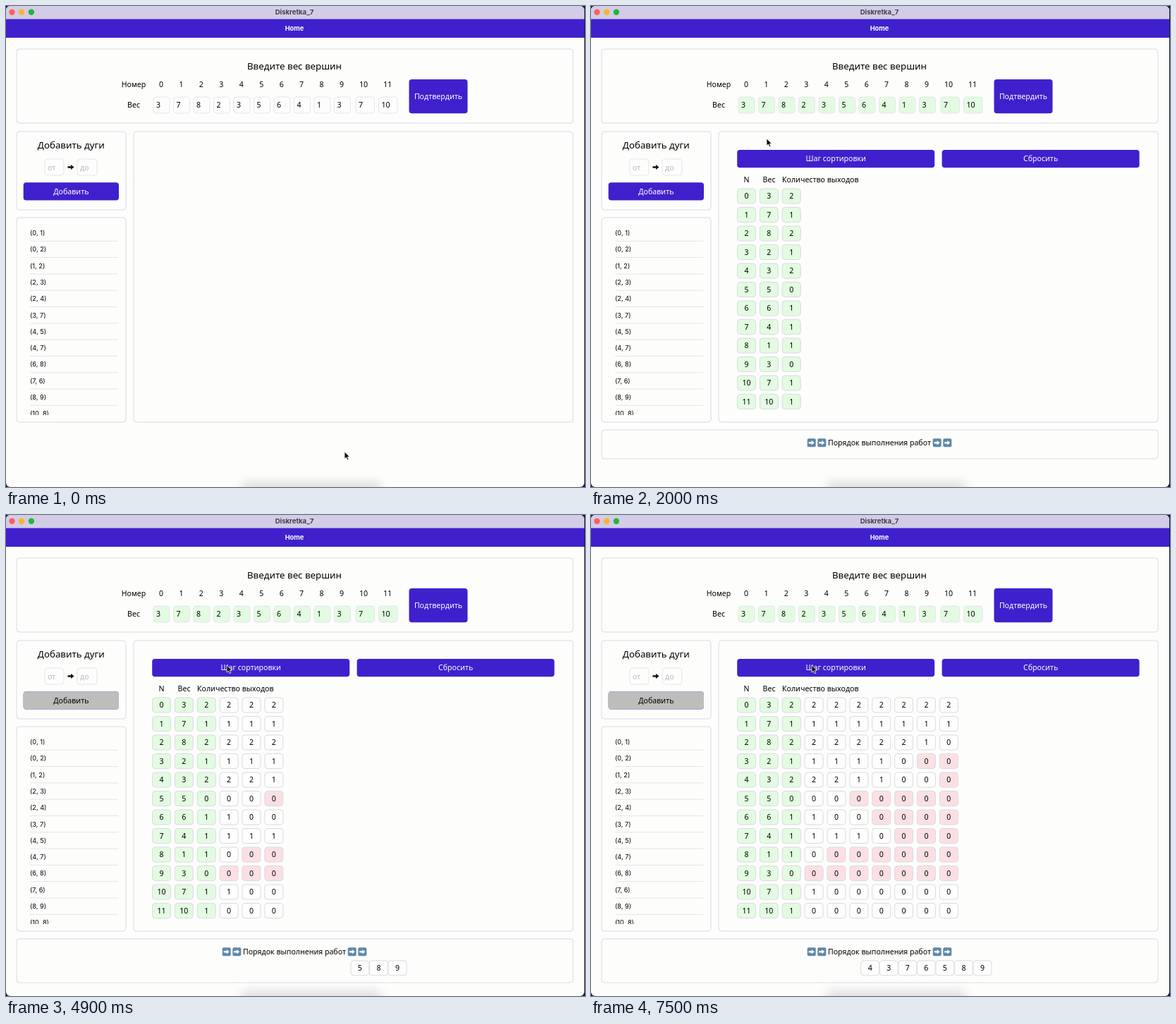
An HTML page that plays this animation: 821 px wide and 682 px high, repeating every 8000 ms.

```html
<!DOCTYPE html>
<html lang="ru">
<head>
<meta charset="utf-8">
<title>Diskretka_7</title>
<style>
  html, body { margin: 0; width: 100%; height: 100%; overflow: hidden; background: #17124a; }
  svg { display: block; }
  text { font: 10.6px "Noto Sans", sans-serif; fill: #000; }
  .big { font-size: 13.25px; }
  .ui { font: 700 9.3px Inter, sans-serif; fill: #fff; }
  .title { font: 700 9.6px Inter, sans-serif; fill: #433e4a; }
  .item { font: 9.2px Inter, sans-serif; }
  .light { fill: #fff; }
  .hint { fill: #b9b9c2; }
</style>
</head>
<body>
<svg id="stage" width="821" height="682" viewBox="0 0 821 682"></svg>
<script>
const LOOP = 8000;
const READY = 2000;
const STEPS = [3300, 4000, 4600, 5200, 5900, 6700, 7500];
const BLUE = '#4020cd', GREY = '#bdbdbc', PAPER = '#fdfdfc', LINE = '#dadae4', FAINT = '#e5e5ec';
const GREEN = '#e3fbe1', PINK = '#fbe0e3';
const weights = [3, 7, 8, 2, 3, 5, 6, 4, 1, 3, 7, 10];
const edges = [[0, 1], [0, 2], [1, 2], [2, 3], [2, 4], [3, 7], [4, 5], [4, 7], [6, 8], [7, 6], [8, 9], [10, 8], [11, 9]];
const removalOrder = [9, 8, 5, 6, 7, 3, 4];

// Cursor path: time, x, y
const path = [[0, 480, 632], [400, 403, 180], [600, 403, 180], [1100, 611, 122], [1300, 611, 122],
  [1600, 249, 188], [2100, 249, 188], [2700, 313, 213], [LOOP, 313, 213]];

const text = (s, x, y, cls = '', anchor = 'middle', size = 10.6) =>
  `<text x="${x}" y="${y + size * 0.357}" class="${cls}" text-anchor="${anchor}">${s}</text>`;
const box = (x, y, w, h, fill = PAPER, line = LINE, extra = '') =>
  `<rect x="${x}" y="${y}" width="${w}" height="${h}" rx="4" fill="${fill}" stroke="${line}" ${extra}/>`;
const button = (s, x, y, w, h, fill = BLUE, cls = 'light') =>
  `<rect x="${x}" y="${y}" width="${w}" height="${h}" rx="4" fill="${fill}"/>` + text(s, x + w / 2, y + h / 2, cls);
const cell = (s, x, y, fill) => box(x - 13, y - 10.5, 26, 21, fill) + text(s, x, y);
const arrow = (x, y, color, scale = 1) =>
  `<path transform="translate(${x} ${y}) scale(${scale})" fill="${color}" d="M-5-1.5H0V-4L5 0L0 4V1.5H-5Z"/>`;
const emoji = x => `<rect x="${x - 6}" y="613.2" width="12" height="12" rx="2" fill="#5f89a8"/>` + arrow(x, 619.2, '#fff', 0.8);
const column = (values, c, fill) =>
  values.map((v, r) => cell(v, 220.5 + 31.87 * c, 269.5 + 26.5 * r, fill(r))).join('');
const group = (id, content) => `<g id="${id}">${content}</g>`;

// The two-digit columns are wider
const inputX = i => i < 10 ? 209 + 28.5 * i : 496 + 32.5 * (i - 10);
const inputWidth = i => i < 10 ? 23 : 26.5;

const weightInputs = fill => weights.map((w, i) =>
  box(inputX(i), 129, inputWidth(i), 23, fill, FAINT) + text(w, inputX(i) + 4, 140.5, '', 'start')).join('');

function header() {
  const lights = ['#fe5f57', '#f9b52c', '#23b53c'].map((c, i) =>
    `<circle cx="${8.5 + 13.7 * i}" cy="8.7" r="4.2" fill="${c}"/>`).join('');
  return `<defs><filter id="blur" x="-20%" width="140%" y="-100%" height="300%"><feGaussianBlur stdDeviation="7"/></filter>
    <clipPath id="window"><rect width="820" height="682" rx="6"/></clipPath>
    <clipPath id="list"><rect x="16" y="301" width="153" height="279"/></clipPath></defs>
    <g clip-path="url(#window)"><rect width="820" height="682" fill="${PAPER}"/>
    <rect width="820" height="18.5" fill="#d3cce6"/><rect y="18.5" width="820" height="26.5" fill="${BLUE}"/>
    <rect x="335" y="675" width="196" height="30" fill="#dededf" filter="url(#blur)"/></g>` + lights +
    text('Diskretka_7', 409, 8.7, 'title', 'middle', 9.6) + text('Home', 409, 31.5, 'ui', 'middle', 9.3);
}

function weightPanel() {
  const labels = weights.map((_, i) => text(i, i < 10 ? 220 + 28.45 * i : 507 + 34 * (i - 10), 111.5)).join('');
  return box(15, 61, 789, 105) + text('Введите вес вершин', 409, 85, 'big', 'middle', 13.25) +
    text('Номер', 181, 111.5) + text('Вес', 181, 140.5) + labels +
    group('blank', weightInputs(PAPER)) + group('valid', weightInputs(GREEN)) +
    button('Подтвердить', 571.5, 104, 83, 48.3);
}

function edgePanels() {
  const items = edges.slice(0, 12).map(([a, b], i) => {
    const y = 321.8 + 23.3 * i;
    return text(`(${a}, ${b})`, 34, y, 'item', 'start', 9.2) + `<path d="M34 ${y + 11.5}H159" stroke="${FAINT}"/>`;
  }).join('');
  const addButton = (fill, cls) => button('Добавить', 24.7, 250.3, 135.3, 25.3, fill, cls);
  return box(15, 178, 155, 111) + text('Добавить дуги', 92.3, 197.7, 'big', 'middle', 13.25) +
    box(55, 217, 27, 23, PAPER, FAINT) + text('от', 59, 229, 'hint', 'start') + arrow(92, 228.5, '#111', 0.9) +
    box(101, 217, 28, 23, PAPER, FAINT) + text('до', 105, 229, 'hint', 'start') +
    addButton(BLUE, 'light') + group('locked', addButton(GREY, '')) +
    box(15, 300, 155, 290) + `<g clip-path="url(#list)">${items}</g>`;
}

function sorter() {
  const degrees = weights.map((_, v) => edges.filter(e => e[0] === v).length);
  const green = () => GREEN;
  const start = box(15, 601, 789, 41, PAPER, LINE, 'id="orderBox"') +
    button('Шаг сортировки', 207.2, 204, 280, 25.3) + button('Сбросить', 497.6, 204, 280, 25.3) +
    text('N', 220.5, 246.5) + text('Вес', 252.5, 246.5) + text('Количество выходов', 271, 246.5, '', 'start') +
    [weights.map((_, i) => i), weights, degrees].map((v, c) => column(v, c, green)).join('') +
    [312.7, 327.3, 490.7, 505.3].map(emoji).join('') + text('Порядок выполнения работ', 409, 619);
  const left = [...degrees];
  const steps = removalOrder.map((node, i) => {
    edges.forEach(([a, b]) => { if (b === node) left[a]--; });
    const done = removalOrder.slice(0, i + 1);
    return group('step' + i, column(left, i + 3, r => done.includes(r) ? PINK : PAPER) +
      cell(node, 555 - 26.55 * i, 642.3, PAPER));
  }).join('');
  return box(181, 178, 623, 412) + group('sorter', start) + steps;
}

const stage = document.getElementById('stage');
stage.innerHTML = header() + weightPanel() + edgePanels() + sorter() +
  '<path id="cursor" d="M0 0V10.2L2.4 8L4 11.8L5.8 11L4.2 7.3H7.3Z" fill="#080808" stroke="#fff" stroke-width=".8"/>';

const el = id => document.getElementById(id);
const show = (id, on) => el(id).setAttribute('visibility', on ? 'visible' : 'hidden');
const ease = p => p * p * (3 - 2 * p);

function cursorAt(t) {
  const i = path.findIndex(p => p[0] > t);
  const [t0, x0, y0] = path[i - 1], [t1, x1, y1] = path[i];
  const p = ease((t - t0) / (t1 - t0));
  return [x0 + (x1 - x0) * p, y0 + (y1 - y0) * p];
}

function draw(now) {
  const t = now % LOOP;
  show('blank', t < READY);
  show('valid', t >= READY);
  show('sorter', t >= READY);
  STEPS.forEach((at, i) => show('step' + i, t >= at));
  el('orderBox').setAttribute('height', t >= STEPS[0] ? 62 : 41);
  el('locked').setAttribute('opacity', Math.min(1, Math.max(0, (t - STEPS[0]) / 250)));
  el('cursor').setAttribute('transform', `translate(${cursorAt(t)})`);
  requestAnimationFrame(draw);
}
requestAnimationFrame(draw);
</script>
</body>
</html>
```
